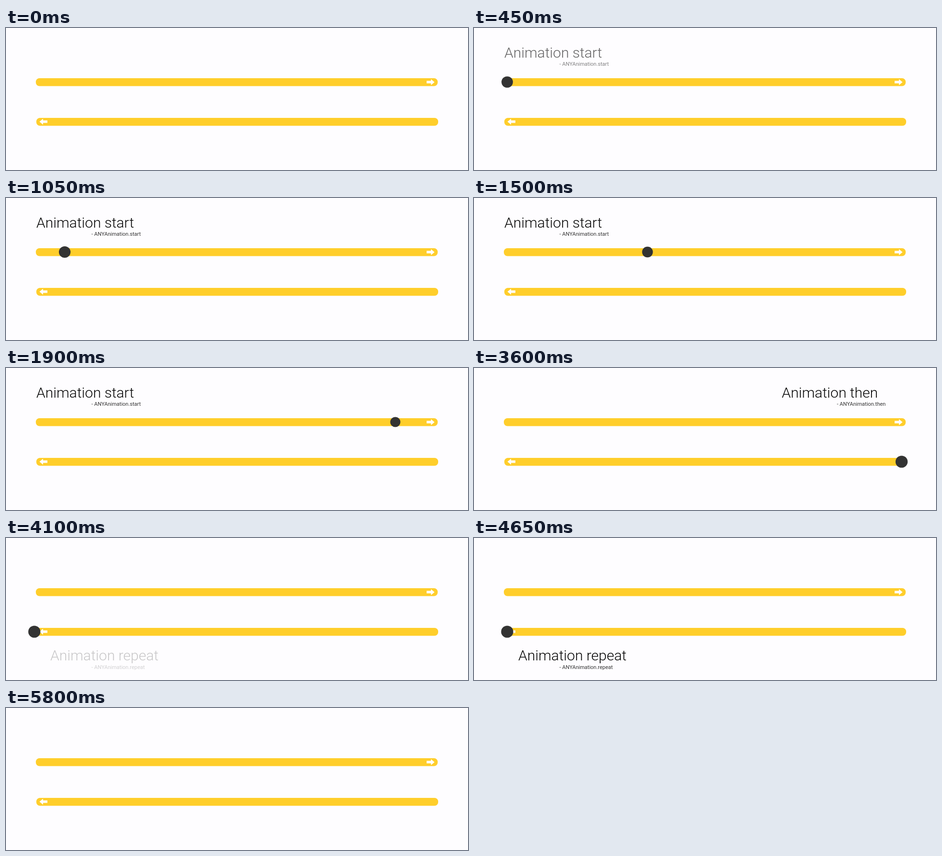
An HTML page that plays this animation: 960x297 px, repeating every 6000 ms.

```html
<!DOCTYPE html>
<html lang="en">
<head>
<meta charset="utf-8">
<title>Animation start, then, repeat</title>
<style>
  html, body { margin: 0; width: 100%; height: 100%; overflow: hidden; background: #fefdff; }
  svg { display: block; width: 960px; height: 297px; }
  text { font-family: Roboto, "Open Sans", sans-serif; }
  .title { font-size: 30px; font-weight: 300; fill: #080808; }
  .sub { font-size: 11px; fill: #333; }
  .bar { fill: #ffce2b; }
  .arrow { fill: #fff; }
  #dot { fill: #333; }
</style>
</head>
<body>
<svg viewBox="0 0 960 297">
  <rect class="bar" x="62" y="105" width="835" height="16.5" rx="7.5"/>
  <rect class="bar" x="63" y="188" width="835" height="16.5" rx="7.5"/>
  <path class="arrow" d="M874 110.5h9v-3.5l7.5 6.2l-7.5 6.2v-3.6h-9z"/>
  <path class="arrow" d="M86 193.3h-9v-3.5l-7.5 6.2l7.5 6.2v-3.6h9z"/>
  <g id="start" opacity="0">
    <text class="title" x="63" y="62">Animation start</text>
    <text class="sub" x="177.500" y="79">- ANYAnimation.start</text>
  </g>
  <g id="then" opacity="0">
    <text class="title" x="639.500" y="62">Animation then</text>
    <text class="sub" x="754" y="79">- ANYAnimation.then</text>
  </g>
  <g id="repeat" opacity="0">
    <text class="title" x="92" y="256">Animation repeat</text>
    <text class="sub" x="177.500" y="273.500">- ANYAnimation.repeat</text>
  </g>
  <circle id="dot" cx="69" cy="113" r="0"/>
</svg>
<script>
const LOOP = 6000, STEP = 50;
const LEFT = 69, RIGHT = 888.5, TOP = 113, BOTTOM = 196, RADIUS = 12.6;
const $ = id => document.getElementById(id);
const dot = $('dot');

// [time, value, slope per ms]
const glide = [
  [500, LEFT, 0], [700, 72, .04], [1050, 122, .25], [1350, 242, .62],
  [1900, 809, 1.15], [2000, 904, .6], [2080, 926, 0],
  [2400, 887.5, 0], [2600, RIGHT, 0]
];
const size = [
  [650, 1, 0], [1050, .96, -.00013], [1900, .84, -.00005],
  [2000, .88, .0007], [2150, 1.01, 0], [2400, 1, 0]
];
const fades = {
  start: [50, 700, 2650, 3300],
  then: [2000, 2700, 3600, 3950],
  repeat: [3950, 4650, 5300, 5800]
};

const ramp = (t, a, b) => Math.min(1, Math.max(0, (t - a) / (b - a)));
const smooth = p => p * p * (3 - 2 * p);
const fade = (t, [a, b, c, d]) => ramp(t, a, b) * (1 - ramp(t, c, d));

function curve(keys, t) {
  const last = keys[keys.length - 1];
  if (t <= keys[0][0]) return keys[0][1];
  if (t >= last[0]) return last[1];
  const i = keys.findIndex(k => k[0] > t);
  const [t0, v0, s0] = keys[i - 1], [t1, v1, s1] = keys[i];
  const d = t1 - t0, p = (t - t0) / d, q = 1 - p;
  return v0 * q * q * (1 + 2 * p) + v1 * p * p * (3 - 2 * p)
    + d * p * q * (s0 * q - s1 * p);
}

// Damped spring from 0 to 1: first peak after `peak` ms, overshooting by `over`
function spring(t, peak, over) {
  if (t <= 0) return 0;
  const w = Math.PI / peak, k = -Math.log(over) / peak;
  return 1 - Math.exp(-k * t) * (Math.cos(w * t) + k / w * Math.sin(w * t));
}

function draw(t) {
  for (const id in fades) $(id).setAttribute('opacity', fade(t, fades[id]));
  const x = curve(glide, t) + (LEFT - RIGHT) * spring(t - 3600, 360, .034);
  const y = TOP + (BOTTOM - TOP) * smooth(ramp(t, 2950, 3600));
  dot.setAttribute('cx', x);
  dot.setAttribute('cy', y);
  dot.setAttribute('r', RADIUS * spring(t - 50, 200, .24) * curve(size, t));
  dot.setAttribute('opacity', 1 - ramp(t, 5300, 5800));
}

const begin = performance.now();
function tick() {
  const t = (performance.now() - begin) % LOOP;
  draw(Math.floor(t / STEP) * STEP);
  requestAnimationFrame(tick);
}
tick();
</script>
</body>
</html>
```
